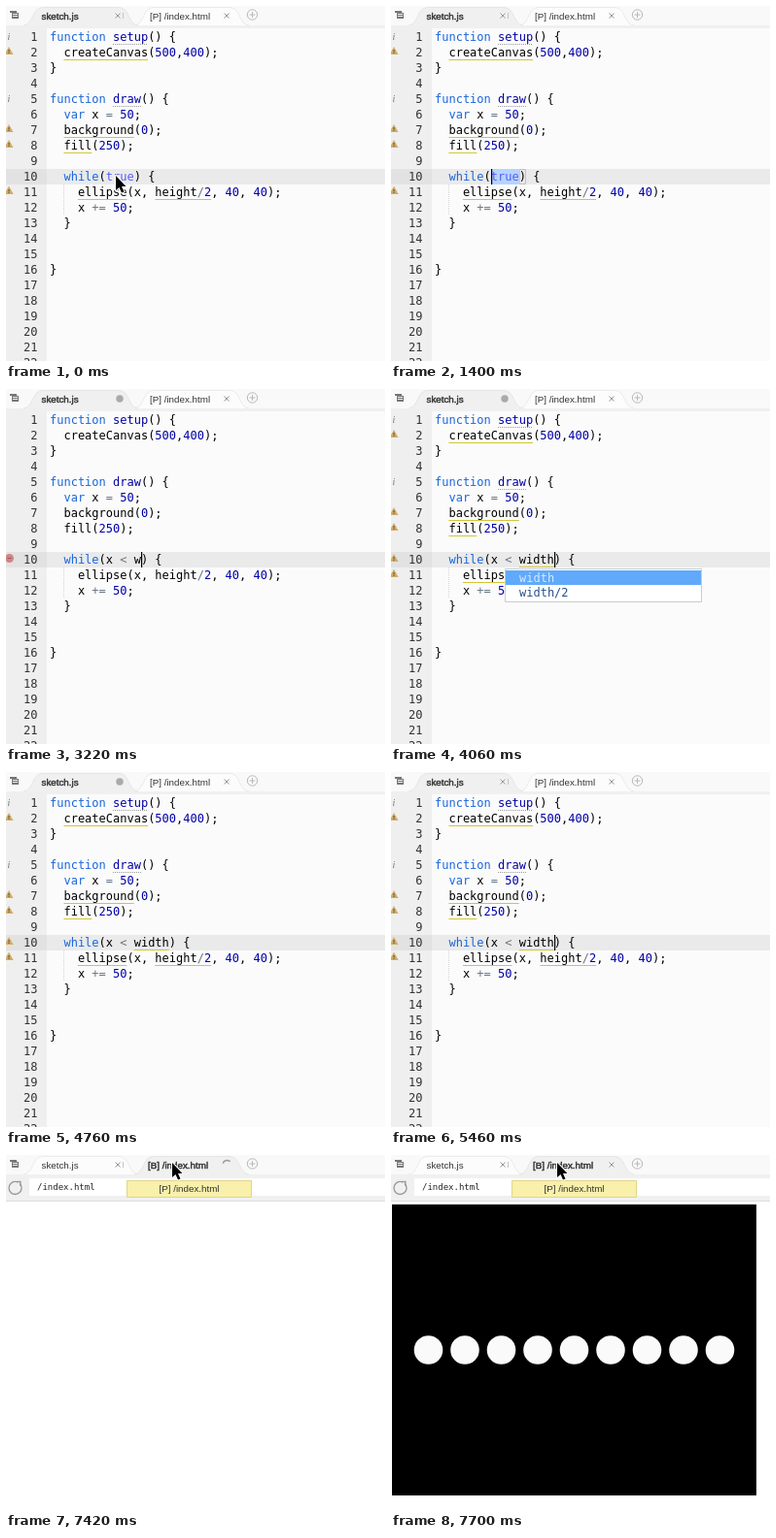
An HTML page with a canvas that plays this animation: 390x366 px, repeating every 8 s.

```html
<!DOCTYPE html>
<html lang="en">
<head>
<meta charset="utf-8">
<title>While loop in an editor</title>
<style>
  html, body { margin: 0; width: 100%; height: 100%; overflow: hidden; background: #fff; }
  canvas { display: block; width: 390px; height: 366px; }
</style>
</head>
<body>
<canvas id="stage"></canvas>
<script>
const LOOP = 8000, STEP = 140;
const W = 390, H = 366;
const CHAR = 7.224, ROW = 16, CODE_X = 45, CODE_Y = 24;
const MONO = '"DejaVu Sans Mono", monospace';
const SANS = '"Liberation Sans", Arial, sans-serif';
const CHROME = '#f0f0f0';

const canvas = document.getElementById('stage');
const scale = window.devicePixelRatio || 1;
canvas.width = W * scale;
canvas.height = H * scale;
const ctx = canvas.getContext('2d');
ctx.scale(scale, scale);

const colX = col => CODE_X + col * CHAR;
const rowY = row => CODE_Y + (row - 1) * ROW;
const between = (t, a, b) => t >= a && t < b;

function rect(x, y, w, h, color) {
  ctx.fillStyle = color;
  ctx.fillRect(x, y, w, h);
}

function frame(x, y, w, h, color) {
  ctx.strokeStyle = color;
  ctx.lineWidth = 1;
  ctx.strokeRect(x, y, w, h);
}

function circle(x, y, r, color) {
  ctx.fillStyle = color;
  ctx.beginPath();
  ctx.arc(x, y, r, 0, Math.PI * 2);
  ctx.fill();
}

function stroke(color, width, draw) {
  ctx.strokeStyle = color;
  ctx.lineWidth = width;
  ctx.beginPath();
  draw();
  ctx.stroke();
}

function line(x1, y1, x2, y2, color, width = 1, dash = []) {
  ctx.setLineDash(dash);
  stroke(color, width, () => { ctx.moveTo(x1, y1); ctx.lineTo(x2, y2); });
  ctx.setLineDash([]);
}

function text(str, x, y, color, font, align = 'left') {
  ctx.font = font;
  ctx.fillStyle = color;
  ctx.textAlign = align;
  ctx.fillText(str, x, y);
}

// ---- Tab bar ----

function tabShape(x1, x2, active) {
  ctx.beginPath();
  ctx.moveTo(x1, 20);
  ctx.bezierCurveTo(x1 + 11, 19, x1 + 8, 1.5, x1 + 20, 1.5);
  ctx.lineTo(x2 - 20, 1.5);
  ctx.bezierCurveTo(x2 - 8, 1.5, x2 - 11, 19, x2, 20);
  ctx.fillStyle = active ? CHROME : '#fcfcfc';
  ctx.fill();
  ctx.strokeStyle = active ? '#e6e6e6' : '#ebebeb';
  ctx.lineWidth = 1;
  ctx.stroke();
}

function tabTitle(str, x, active) {
  text(str, x, 14, '#333', `9.8px ${SANS}`);
  if (active) {
    ctx.strokeStyle = '#333';
    ctx.lineWidth = 0.45;
    ctx.strokeText(str, x, 14);
  }
}

function cross(x, y) {
  line(x - 2.5, y - 2.5, x + 2.5, y + 2.5, '#999');
  line(x - 2.5, y + 2.5, x + 2.5, y - 2.5, '#999');
}

function tabBar({ preview, dirty, loading }) {
  rect(0, 0, W, 20, '#f9f9f9');
  const tabs = [
    () => tabShape(132, 250, preview),
    () => tabShape(18, 136, !preview)
  ];
  if (preview) tabs.reverse();
  tabs.forEach(draw => draw());

  rect(4, 5, 7, 2, '#777');
  rect(6, 7, 7, 6, '#777');
  for (const y of [8, 10]) rect(7, y, 5, 1, '#eee');

  tabTitle('sketch.js', 36.5, !preview);
  if (dirty) circle(117, 10, 3.7, '#aaa');
  else {
    cross(115, 10);
    line(120.5, 7, 120.5, 13, '#c4c4c4');
  }
  tabTitle(preview ? '[B] /index.html' : '[P] /index.html', preview ? 146 : 148, preview);
  if (loading) stroke('#999', 1.5, () => ctx.arc(227.5, 10, 4.5, Math.PI * 1.1, Math.PI * 1.75));
  else cross(227, 10);

  stroke('#b8b8b8', 1, () => ctx.arc(253.5, 9, 5.2, 0, Math.PI * 2));
  line(250.5, 9, 256.5, 9, '#b8b8b8');
  line(253.5, 6, 253.5, 12, '#b8b8b8');
}

// ---- Editor ----

const TOKENS = /\b(?:function|var|while|true)\b|\b(?:setup|draw)\b|\d+|\+=|[^\s]/g;

function tokenColor(token) {
  if (token === 'true') return '#585cf6';
  if (/^(function|var|while)$/.test(token)) return '#1a66dc';
  if (/^(setup|draw)$/.test(token)) return '#0000a2';
  if (/^\d/.test(token)) return '#0000a8';
  if (/^(\+=|=|<|\/)$/.test(token)) return '#687687';
  return '#000';
}

function codeLine(str, row) {
  for (const match of str.matchAll(TOKENS)) {
    text(match[0], colX(match.index), rowY(row) + 12, tokenColor(match[0]), `12px ${MONO}`);
  }
}

function warningIcon(row) {
  const y = rowY(row) + 2;
  ctx.beginPath();
  ctx.moveTo(3, y);
  ctx.lineTo(7.5, y + 8);
  ctx.lineTo(-1.5, y + 8);
  ctx.closePath();
  ctx.fillStyle = '#d0ad68';
  ctx.fill();
  rect(2.5, y + 3, 1, 2.5, '#5d4a22');
  rect(2.5, y + 6, 1, 1, '#5d4a22');
}

function infoIcon(row) {
  text('i', 1.5, rowY(row) + 11, '#777', `italic 10px "Liberation Serif", serif`);
}

function underline(row, col, length) {
  const y = rowY(row) + 15.5;
  line(colX(col), y, colX(col + length), y, '#d2c636');
}

function lintMarks(warnWidth) {
  for (const [row, length] of [[1, 5], [5, 4]]) {
    const y = rowY(row) + 15.5;
    infoIcon(row);
    line(colX(9), y, colX(9 + length), y, '#999', 1, [1, 1]);
  }
  const marks = [[2, 2, 12], [7, 2, 10], [8, 2, 4], [11, 4, 7], [11, 15, 8]];
  if (warnWidth) marks.push([10, 12, 5]);
  for (const [row, col, length] of marks) {
    warningIcon(row);
    underline(row, col, length);
  }
}

function popup() {
  rect(117.5, 185.5, 202, 34, '#fff');
  frame(117.5, 185.5, 202, 34, '#ccc');
  rect(118, 187, 201, 15, '#61a9fb');
  text('width', 132, 199, '#d6eaff', `12px ${MONO}`);
  text('width/2', 132, 214, '#294f86', `12px ${MONO}`);
}

function editor({ condition, selected, caretCol, caretOn, lint, popupOpen, bracket }) {
  rect(0, 20, W, H - 20, '#fbfbfb');
  rect(0, 20, W, 3, CHROME);
  rect(0, 20, 42, H - 20, '#efefef');
  rect(0, rowY(10), 42, ROW, '#e2e2e2');
  rect(42, rowY(10), W - 42, ROW, '#eaeaea');
  if (selected) rect(colX(12 - selected), rowY(10), selected * CHAR, ROW, '#b5d5ff');
  if (bracket) frame(colX(12) + 0.5, rowY(10) + 0.5, CHAR - 1, ROW - 1, '#c0c0c0');

  const code = [
    'function setup() {', '  createCanvas(500,400);', '}', '',
    'function draw() {', '  var x = 50;', '  background(0);', '  fill(250);', '',
    `  while(${condition}) {`, '    ellipse(x, height/2, 40, 40);', '    x += 50;', '  }',
    '', '', '}'
  ];
  for (let row = 1; row <= 22; row++) {
    text(row, 32.5, rowY(row) + 12, '#333', `12px ${MONO}`, 'right');
    codeLine(code[row - 1] || '', row);
  }
  line(59.5, rowY(11), 59.5, rowY(13), '#d5d5d5', 1, [1, 1]);

  if (lint === 'error') {
    circle(3.5, rowY(10) + 6.5, 4.5, '#cf8585');
    rect(1.5, rowY(10) + 6, 4, 1, '#a55');
  } else {
    lintMarks(condition.endsWith('width'));
  }
  if (caretOn) rect(Math.round(colX(caretCol)), rowY(10), 1.2, ROW, '#000');
  if (popupOpen) popup();
}

// ---- Preview ----

function preview({ loading, tooltip }) {
  rect(0, 20, W, H - 20, '#fff');
  rect(0, 20, W, 27, CHROME);
  rect(24, 24, W - 24, 18, '#fff');
  line(0, 47.5, W, 47.5, '#dedede');
  stroke('#999', 1.3, () => ctx.arc(9.5, 34, 6.5, -0.8, Math.PI * 1.65));
  line(11, 27.5, 15.5, 27.5, '#999', 1.3);
  line(14.8, 27.5, 14.8, 32, '#999', 1.3);
  text('/index.html', 32, 36, '#222', `9px ${MONO}`);
  if (!loading) {
    rect(1, 51, 375, 300, '#000');
    for (let i = 0; i < 9; i++) circle(38.5 + i * 37.5, 201, 14.8, '#fafafa');
  }
  if (tooltip) {
    rect(124, 26, 129, 18, '#f8f0ab');
    frame(124.5, 26.5, 128, 17, '#dfd68c');
    text('[P] /index.html', 188.5, 38, '#333', `9.8px ${SANS}`, 'center');
  }
}

function pointer(x, y) {
  const outline = [[0, 0], [0, 15], [3.5, 12], [6, 17.5], [8.5, 16.5], [6, 11], [10.5, 11]];
  ctx.beginPath();
  outline.forEach(([dx, dy]) => ctx.lineTo(x + dx, y + dy));
  ctx.closePath();
  ctx.lineJoin = 'round';
  ctx.strokeStyle = '#fff';
  ctx.lineWidth = 2;
  ctx.stroke();
  ctx.fillStyle = '#000';
  ctx.fill();
}

// ---- Timeline ----

const KEY_TIMES = [1820, 1960, 2100, 2240, 3220, 3500, 3640, 3780, 3920];
const CARET_OFF = [[2660, 3220], [4760, 5180], [5600, 6160], [6300, 6720]];
const POINTER_PATH = [
  [0, 113, 175], [280, 122, 176], [420, 132, 176], [700],
  [6720, 130, 110], [6860, 158, 45], [7000, 171, 8]
];

function render(time) {
  const t = Math.floor(time % LOOP / STEP) * STEP;
  const showPreview = t >= 7140;
  const loading = showPreview && t < 7700;
  const typed = KEY_TIMES.filter(k => t >= k).length;

  ctx.clearRect(0, 0, W, H);
  if (showPreview) {
    preview({ loading, tooltip: t >= 7420 });
  } else {
    const selected = typed || t < 700 ? 0 : Math.min(4, 1 + (t - 700) / STEP);
    editor({
      condition: typed ? 'x < width'.slice(0, typed) : 'true',
      selected,
      caretCol: typed ? 8 + typed : 12 - selected,
      caretOn: t >= 700 && !CARET_OFF.some(([a, b]) => between(t, a, b)),
      lint: between(t, 2660, 3920) ? 'error' : 'warnings',
      popupOpen: between(t, 3780, 4340),
      bracket: selected > 0
    });
  }
  tabBar({ preview: showPreview, dirty: between(t, 1820, 5180), loading });

  const [, x, y] = POINTER_PATH.filter(p => t >= p[0]).pop();
  if (x !== undefined) pointer(x, y);
}

const start = performance.now();
function tick() {
  render(performance.now() - start);
  requestAnimationFrame(tick);
}
tick();
</script>
</body>
</html>
```
